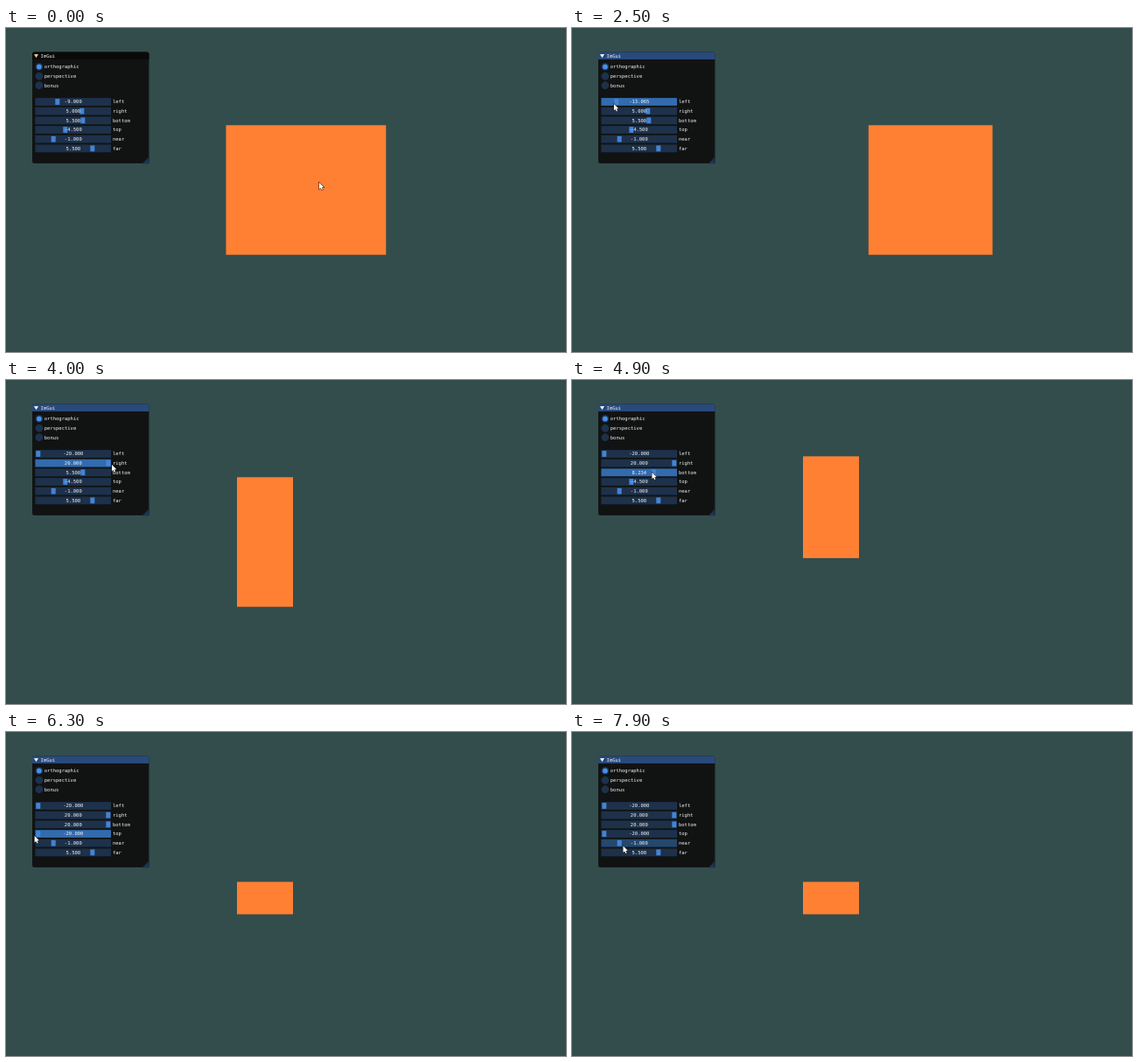
An HTML page with a canvas for the animation above (8000 ms loop, 640x371 px).

```html
<!DOCTYPE html>
<html lang="en">
<head>
<meta charset="utf-8">
<title>Projection sliders</title>
<style>
html, body { margin: 0; width: 100%; height: 100%; overflow: hidden; background: #334d4d; }
canvas { display: block; width: 640px; height: 371px; }
</style>
</head>
<body>
<canvas id="stage" width="640" height="371"></canvas>
<script>
const W = 640, H = 371, LOOP = 8000, STEP = 100;
const ctx = document.getElementById("stage").getContext("2d");

const color = {
  back: "#334d4d", quad: "#ff8033", panel: "#111313", edge: "#202a2c",
  title: "#0a0a0a", titleOn: "#294a7a", frame: "#1e314b", hover: "#25486f",
  active: "#326bae", grab: "#4284d6", check: "#4690e8", grip: "#1d3555",
  text: "#f2f2f2"
};

// Pointer path: time, x, y
const path = [
  [0, 358, 177], [100, 358, 177], [400, 334, 165.5], [600, 333, 165],
  [900, 332, 165], [1300, 332, 165], [1900, 56.1, 86], [2000, 56.1, 86],
  [2500, 47.97, 87], [2800, 30, 88], [2900, 30, 88], [3600, 84.5, 95.5],
  [3800, 86.3, 96], [4000, 121, 97], [4200, 121, 97], [4700, 86, 105.5],
  [4800, 86, 105.5], [5200, 121, 107], [5300, 121, 107], [5600, 71, 119.5],
  [5800, 66, 119], [6400, 30, 119], [6500, 30, 119], [6900, 71.994, 118.5],
  [7300, 26, 119], [7400, 25.5, 119], [7900, 58.5, 130.5], [8000, 58.5, 130.5]
];

// Sliders; drag = [press, release] times
const rows = [
  { name: "left", init: -9, drag: [2000, 2900] },
  { name: "right", init: 5, drag: [3600, 4200] },
  { name: "bottom", init: 5.5, drag: [4800, 5300] },
  { name: "top", init: -4.5, drag: [5800, 7400] },
  { name: "near", init: -1, grab: 54.2 },
  { name: "far", init: 5.5, grab: 98.8 }
];
const TRACK = { x: 33.4, w: 86.6, h: 8.8, mid: 76.8, px: 2 };
const rowY = i => 80.1 + i * 10.68;

const clamp = (v, lo, hi) => Math.max(lo, Math.min(hi, v));

function pointer(t) {
  let i = 0;
  while (i < path.length - 2 && t >= path[i + 1][0]) i++;
  const [t0, x0, y0] = path[i], [t1, x1, y1] = path[i + 1];
  const u = clamp((t - t0) / (t1 - t0), 0, 1), e = u * u * (3 - 2 * u);
  return { x: x0 + (x1 - x0) * e, y: y0 + (y1 - y0) * e };
}

function valueOf(row, t) {
  if (!row.drag || t < row.drag[0]) return row.init;
  const move = pointer(Math.min(t, row.drag[1])).x - pointer(row.drag[0]).x;
  return clamp(row.init + move / TRACK.px, -20, 20);
}

const isHeld = (row, t) => Boolean(row.drag) && t >= row.drag[0] && t < row.drag[1];

function box(x, y, w, h, fill) {
  ctx.fillStyle = fill;
  ctx.fillRect(x, y, w, h);
}

function shape(points, fill, stroke) {
  ctx.beginPath();
  points.forEach(([x, y]) => ctx.lineTo(x, y));
  ctx.closePath();
  if (stroke) {
    ctx.strokeStyle = stroke;
    ctx.lineWidth = 1.1;
    ctx.stroke();
  }
  ctx.fillStyle = fill;
  ctx.fill();
}

function disc(x, y, r, fill) {
  ctx.beginPath();
  ctx.arc(x, y, r, 0, Math.PI * 2);
  ctx.fillStyle = fill;
  ctx.fill();
}

function label(str, x, y, align = "left") {
  ctx.textAlign = align;
  ctx.fillStyle = color.text;
  ctx.fillText(str, x, y);
}

// Orthographic projection of the rectangle (-3.5, -1.5) to (0.5, 2.5)
function drawQuad([left, right, bottom, top]) {
  const sx = W / (right - left), sy = H / (bottom - top);
  box((-3.5 - left) * sx, (-1.5 - top) * sy, 4 * sx, 4 * sy, color.quad);
}

function drawSlider(row, i, t, value, mouse, busy) {
  const y = rowY(i), held = isHeld(row, t);
  const over = !busy && mouse.x >= TRACK.x && mouse.x <= TRACK.x + TRACK.w &&
    mouse.y >= y && mouse.y <= y + TRACK.h;
  box(TRACK.x, y, TRACK.w, TRACK.h, held ? color.active : over ? color.hover : color.frame);
  const gx = row.grab || TRACK.mid + value * TRACK.px;
  box(gx - 2.5, y + 1, 5, TRACK.h - 2, color.grab);
  label(value.toFixed(3), TRACK.mid, y + 6.3, "center");
  label(row.name, 122, y + 6.3);
}

function drawPanel(t, values, mouse) {
  const on = t >= 2000;
  ctx.save();
  ctx.beginPath();
  ctx.roundRect(30, 27.6, 133.4, 127.4, 2.5);
  ctx.fillStyle = color.panel;
  ctx.fill();
  ctx.save();
  ctx.clip();
  box(30, 27, 134, 9, on ? color.titleOn : color.title);
  shape([[163.4, 148], [163.4, 155], [156.2, 155]], color.grip);
  ctx.restore();
  ctx.strokeStyle = color.edge;
  ctx.lineWidth = 0.5;
  ctx.stroke();
  ctx.restore();

  shape([[32, 30], [37, 30], [34.5, 34.3]], on ? color.text : "#f0c48a");
  label("ImGui", 39.6, 34);
  ["orthographic", "perspective", "bonus"].forEach((name, i) => {
    const y = 44.4 + i * 10.68;
    disc(37.9, y, 4.4, color.frame);
    if (!i) disc(37.9, y, 2.9, color.check);
    label(name, 43.8, y + 1.9);
  });

  const busy = rows.some(row => isHeld(row, t));
  rows.forEach((row, i) => drawSlider(row, i, t, values[i], mouse, busy));
}

function drawPointer({ x, y }) {
  const outline = [[0, 0], [0, 7.4], [1.7, 5.9], [2.8, 8.4], [4, 7.9], [3, 5.5], [5.2, 5.3]];
  shape(outline.map(([dx, dy]) => [x + dx, y + dy]), "#fff", "#1c1c1c");
}

function draw(t) {
  const values = rows.map(row => valueOf(row, t)), mouse = pointer(t);
  ctx.font = '5.5px "DejaVu Sans Mono", monospace';
  box(0, 0, W, H, color.back);
  drawQuad(values);
  drawPanel(t, values, mouse);
  drawPointer(mouse);
}

const start = performance.now();
function tick() {
  const t = (performance.now() - start) % LOOP;
  draw(Math.floor(t / STEP) * STEP);
  requestAnimationFrame(tick);
}
tick();
</script>
</body>
</html>
```
